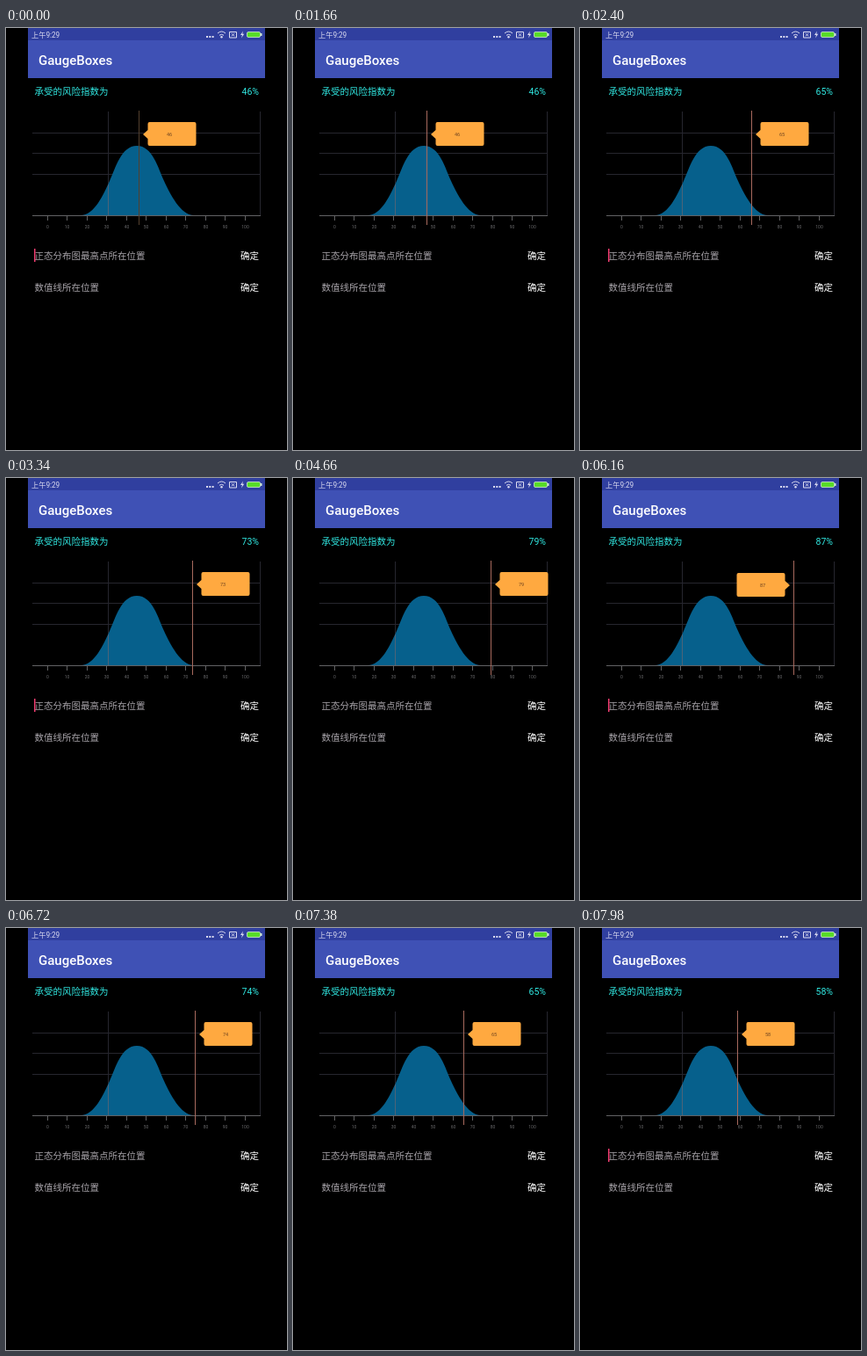
An HTML page that plays this animation: 320 px wide and 480 px high, repeating every 8000 ms.

```html
<!DOCTYPE html>
<html lang="zh">
<head>
<meta charset="utf-8">
<title>Distribution chart</title>
<style>
  html, body { margin: 0; width: 100%; height: 100%; overflow: hidden; background: #000; }
  svg { display: block; width: 320px; height: 480px; }
  text { font-family: Roboto, "Noto Sans CJK SC", "Noto Sans CJK", sans-serif; font-size: 10.5px; }
  .end { text-anchor: end; }
  .mid { text-anchor: middle; }
  .cyan { fill: #30e6e0; }
  .hint { fill: #a8a4aa; }
  .ok { fill: #fff; }
  .tiny { font-size: 5px; fill: #6a6a6c; text-anchor: middle; }
  .grid { stroke: #26262e; fill: none; }
  .axis { stroke: #626264; fill: none; }
  .icon { stroke: #dcdcf0; fill: none; }
</style>
</head>
<body>
<svg viewBox="0 0 320 480" lang="zh-CN">
  <rect width="320" height="480"/>

  <!-- status bar and title -->
  <rect x="25" width="270" height="14" fill="#303f9f"/>
  <rect x="25" y="14" width="270" height="43" fill="#3f51b5"/>
  <text x="29" y="10.5" fill="#dcdcf0" style="font-size:8.2px">上午9:29</text>
  <g fill="#dcdcf0">
    <rect x="228" y="9" width="2" height="2"/>
    <rect x="231.3" y="9" width="2" height="2"/>
    <rect x="234.6" y="9" width="2" height="2"/>
    <circle cx="245.5" cy="10.3" r="1.2"/>
    <path d="M270 3.5l-3 4.5h2l-1 3.5 3.2-4.7h-2z"/>
  </g>
  <path class="icon" d="M241 6q4.5-4 9 0M243 8.3q2.5-2 5 0"/>
  <path class="icon" d="M254.5 4.5h8v6.5h-8zM257 6.2l3 3M260 6.2l-3 3"/>
  <rect x="274.5" y="4.5" width="15" height="6" rx="1.5" fill="#58dc28" stroke="#d0e8d0" stroke-width=".8"/>
  <rect x="290" y="6" width="1.5" height="3" fill="#d0e8d0"/>
  <text x="37" y="42" fill="#fff" style="font-size:15px;font-weight:500">GaugeBoxes</text>

  <text class="cyan" x="32.5" y="76">承受的风险指数为</text>
  <text class="cyan end" id="percent" x="288" y="76"></text>

  <!-- chart -->
  <path class="grid" d="M30 119.5H290M30 142.5H290M30 166.5H290M116.5 95V213M289.5 95V213"/>
  <path fill="#06608c" d="M85 213C101 213 111 189 118 174S131 134 149 134C167 134 173 159 180 174S199 213 214 213Z"/>
  <path d="M116.5 178V213" stroke="#4c6478"/>
  <path class="axis" d="M30 213.5H290"/>
  <g id="ticks"></g>

  <path id="line" d="M0 94V224"/>
  <g id="bubble">
    <path id="shape" fill="#ffa940"/>
    <text class="mid" id="tag" y="122.5" fill="#6e4420" style="font-size:5.5px"></text>
  </g>

  <!-- input rows -->
  <text class="hint" x="32.5" y="262.5">正态分布图最高点所在位置</text>
  <text class="ok end" x="288" y="262.5">确定</text>
  <text class="hint" x="32.5" y="299">数值线所在位置</text>
  <text class="ok end" x="288" y="299">确定</text>
  <rect id="caret" x="32" y="251" width="1.5" height="15" fill="#f03c70"/>
</svg>

<script>
const LOOP = 8000, ORIGIN = 47.3, UNIT = 2.25;
const START = 1640;
const $ = id => document.getElementById(id);

// Drag path: time, line x, pause
const drag = [
  [START, 151.5, 0], [2400, 195.5, 100], [3240, 211.7, 100], [3340, 212.5, 0],
  [4080, 217, 100], [4660, 225.5, 100], [4940, 246, 100], [5600, 268.5, 20],
  [5840, 261, 0], [6580, 220.5, 100], [6720, 215.5, 100], [7420, 192.5, 100],
  [7980, 179.5, 20]
];

function lineX(t) {
  const i = drag.findIndex(k => k[0] > t);
  if (i === 0) return drag[0][1];
  if (i < 0) return drag[drag.length - 1][1];
  const [t0, x0, pause] = drag[i - 1], [t1, x1] = drag[i];
  const p = Math.max(0, (t - t0 - pause) / (t1 - t0 - pause));
  return x0 + (x1 - x0) * p;
}

function bubblePath(left) {
  const s = left ? -1 : 1, sweep = left ? 0 : 1;
  const arc = (x, y) => `A2 2 0 0 ${sweep} ${s * x} ${y}`;
  return `M${s * 4.5} 121L${s * 10} 116V109${arc(12, 107)}H${s * 63}${arc(65, 109)}` +
    `V132${arc(63, 134)}H${s * 12}${arc(10, 132)}V126Z`;
}

$('ticks').innerHTML = Array.from({ length: 11 }, (_, i) => {
  const x = Math.floor(47 + 22.5 * i) + .5;
  return `<path class="axis" d="M${x} 214V219"/><text class="tiny" x="${x}" y="227.5">${i * 10}</text>`;
}).join('');

function draw(now) {
  const t = Math.floor(now % LOOP / 20) * 20;
  const x = lineX(t), px = Math.floor(x);
  const value = Math.floor((x - ORIGIN) / UNIT);
  const left = x > 229;

  $('percent').textContent = value + '%';
  $('tag').textContent = value;
  $('tag').setAttribute('x', left ? -35.5 : 34.5);
  $('shape').setAttribute('d', bubblePath(left));
  $('bubble').setAttribute('transform', `translate(${px + .5} ${left ? 1 : 0})`);
  $('line').setAttribute('transform', `translate(${px + .5} 0)`);
  $('line').setAttribute('stroke', t <= START ? '#54402e' : '#a86a5e');

  const blink = Math.floor((t - 830) / 1340);
  $('caret').style.visibility = blink % 2 ? 'visible' : 'hidden';
}

const begin = performance.now();
function frame() {
  draw(performance.now() - begin);
  requestAnimationFrame(frame);
}
frame();
</script>
</body>
</html>
```
